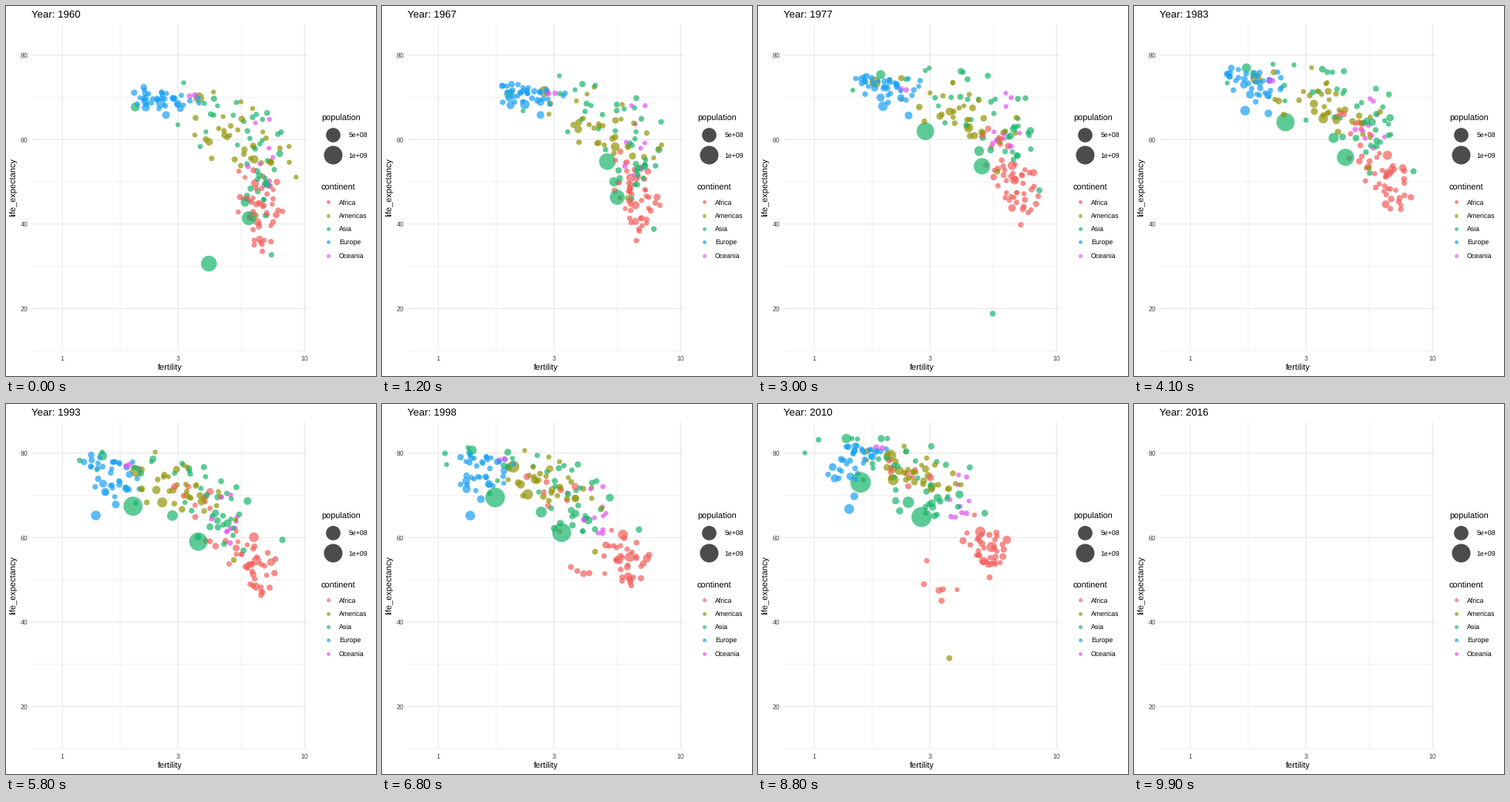
Write a matplotlib script that moves like this. It is 480 px wide and 480 px high and loops after 10 s.

```python
import numpy as np
import matplotlib.pyplot as plt
from matplotlib.animation import FuncAnimation

SIZE, DPI = 480, 96
PT = 72 / DPI
FRAMES, INTERVAL = 100, 100
FIRST, LAST, END = 1960, 2015, 2016
KEYS = [1960, 1977, 1993, 2004]
COLORS = {
    "Africa": "#F35E5A",
    "Americas": "#929507",
    "Asia": "#18B56A",
    "Europe": "#18A0F4",
    "Oceania": "#E252F1",
}
ALPHA = 0.7

rng = np.random.default_rng(5)
plt.rcParams["font.family"] = "Liberation Sans"
plt.rcParams["text.hinting"] = "none"

fig = plt.figure(figsize=(SIZE / DPI, SIZE / DPI), dpi=DPI, facecolor="white")
ax = fig.add_axes([0, 0, 1, 1])
ax.set_xlim(0, SIZE)
ax.set_ylim(SIZE, 0)
ax.axis("off")


# ---- scales ----
def px_x(fertility):
    return 73 + 314.3 * np.log10(fertility)


def px_y(life):
    return 63.7 + (80 - life) * 5.477


def radius(people):
    """Radius in pixels for a population in millions."""
    return 2.96 + 10.66 * np.sqrt(np.asarray(people) / 1376)


def area(r):
    return (2 * np.asarray(r) * PT) ** 2


# ---- grid, axes and legend ----
def label(x, y, s, size, color="black", **kw):
    return ax.text(x, y, s, fontsize=size * PT, color=color,
                   va="baseline", **kw)


def rule(xs, ys, width):
    ax.plot(xs, ys, color="#E6E6E6", lw=width * PT, zorder=1,
            solid_capstyle="butt", snap=False)


LEFT, RIGHT, TOP, BOTTOM = 33, 392, 24, 447
for life in range(10, 81, 10):
    rule([LEFT, RIGHT], [px_y(life)] * 2, 0.55 if life % 20 else 1.1)
    if life % 20 == 0:
        label(28.3, px_y(life) + 3.3, str(life), 8.8, "#444444", ha="right")
for f in (1, 3, 10):
    rule([px_x(f)] * 2, [TOP, BOTTOM], 1.1)
    label(px_x(f), 460, str(f), 8.8, "#444444", ha="center")
for f in (3 ** 0.5, 30 ** 0.5):
    rule([px_x(f)] * 2, [TOP, BOTTOM], 0.55)

label(212.5, 473, "fertility", 11, ha="center")
label(13, 235.5, "life_expectancy", 11, ha="center", rotation=90,
      rotation_mode="anchor")
title = label(33, 15, "", 13.2)

label(409, 149, "population", 11)
for y, people, name in ((166.7, 500, "5e+08"), (193.2, 1000, "1e+09")):
    ax.scatter(423.6, y, s=area(radius(people)), c="black", alpha=ALPHA, lw=0)
    label(444.5, y + 3.3, name, 8.8)
label(409, 239, "continent", 11)
for i, (name, color) in enumerate(COLORS.items()):
    y = 254.3 + 17.3 * i
    ax.scatter(417.6, y, s=area(2.45), c=color, alpha=ALPHA, lw=0)
    label(432, y + 3.4, name, 8.8)


# ---- countries ----
class Country:
    """Follows (fertility, life) key points, offset by its own deviation."""

    def __init__(self, continent, people, growth, path,
                 wide=(0, 0), tall=(0, 0), corr=0, shock=None):
        self.color = COLORS[continent]
        self.people, self.growth = people, growth
        fertility, self.life = np.transpose(path)
        self.logf = np.log10(fertility)
        self.wide, self.tall, self.corr = wide, tall, corr
        self.shock = shock
        self.home = np.clip(rng.normal(size=2), -1.8, 1.8)
        self.phase = rng.uniform(0, 2 * np.pi, 2)

    def at(self, year):
        t = (year - FIRST) / (LAST - FIRST)
        logf = np.interp(year, KEYS, self.logf)
        life = np.interp(year, KEYS, self.life)

        u, w = self.home + 0.35 * np.sin(t * 9 + self.phase)
        v = self.corr * u + np.sqrt(1 - self.corr ** 2) * w
        logf += u * np.interp(t, [0, 1], self.wide)
        life += v * np.interp(t, [0, 1], self.tall)

        # families converge on two children while lives keep lengthening
        late = max(year - KEYS[-1], 0)
        logf += 0.017 * late * (np.log10(2) - logf)
        life += 0.27 * late

        if self.shock:
            when, span, births, years = self.shock
            hit = np.exp(-((year - when) / span) ** 2)
            logf -= births * hit
            life -= years * hit
        life = min(life, 74 + 0.19 * (year - FIRST))
        people = self.people * (1 + (self.growth - 1) * t)
        return px_x(10 ** min(logf, 0.965)), px_y(life), radius(people)


countries = []


def track(*args, **kw):
    countries.append(Country(*args, **kw))


def group(n, continent, typical, growth, path, wide, tall, corr=-0.3):
    for _ in range(n):
        people = min(typical * np.exp(1.2 * rng.normal()), 60)
        track(continent, people, growth, path, wide, tall, corr)


# western and eastern Europe
group(20, "Europe", 6, 1.2, [(2.63, 70.6), (1.89, 74.1), (1.63, 77.8), (1.6, 79.4)],
      (0.065, 0.06), (1.4, 1.1))
group(18, "Europe", 5, 1.1, [(2.59, 68.3), (2.19, 70.5), (1.63, 71.2), (1.31, 73.7)],
      (0.07, 0.04), (2, 3))
# central, northern and southern Africa
group(35, "Africa", 3, 3, [(6.34, 42.3), (6.8, 49.3), (6.1, 54.2), (5.67, 56.2)],
      (0.042, 0.05), (5, 3.2))
group(8, "Africa", 4, 2.5, [(6.97, 49.3), (5.76, 58.8), (3.53, 69.7), (2.54, 73.4)],
      (0.04, 0.1), (4, 3), -0.6)
group(6, "Africa", 2, 2.5, [(6.34, 46), (6.1, 53.3), (4.4, 60.2), (3.6, 46)],
      (0.04, 0.06), (2.5, 3.5))
# Asia, early and late in the transition
group(20, "Asia", 4, 2.2, [(5.1, 62.8), (4.24, 68.8), (2.77, 73.4), (2.22, 75.2)],
      (0.11, 0.16), (4, 3.2), -0.4)
group(18, "Asia", 7, 2.4, [(6.57, 51.5), (6.47, 60.2), (4.56, 63.9), (3.05, 67.5)],
      (0.05, 0.1), (6.5, 4))
group(33, "Americas", 3.5, 2, [(5.4, 60.2), (4, 66.6), (3.05, 71.9), (2.63, 74.3)],
      (0.12, 0.1), (5.5, 3), -0.6)
# Pacific islands, Australia and New Zealand
group(10, "Oceania", 0.3, 2, [(6.2, 54.2), (5.6, 61.5), (4.49, 63.3), (3.94, 66)],
      (0.06, 0.05), (7, 4))
group(2, "Oceania", 4, 2, [(3.5, 71), (2.32, 72.5), (1.89, 77.8), (1.84, 80.5)],
      (0.02, 0.02), (0.4, 0.5))

# China, India, Indonesia, Japan
track("Asia", 645, 2.13, [(7.2, 50), (2.87, 62), (1.95, 67.5), (1.51, 71.5)],
      shock=(1960.3, 1.7, 0.26, 20))
track("Asia", 450, 2.9, [(5.89, 41.4), (4.92, 53.7), (3.63, 59.1), (2.87, 63.3)])
track("Asia", 88, 2.9, [(5.68, 45.1), (4.79, 57.3), (2.83, 65.3), (2.5, 66.8)])
track("Asia", 93, 1.36, [(2, 67.7), (1.88, 75.4), (1.46, 79.4), (1.3, 82)])
# Hong Kong, Macau, Yemen, Cambodia
track("Asia", 3, 2.3, [(3.85, 68.6), (2.39, 74.3), (1.17, 78.3), (0.97, 81.6)])
track("Asia", 0.2, 3, [(3, 63.5), (1.44, 71.7), (1.39, 76.1), (0.84, 78.5)])
track("Asia", 5, 5, [(7.3, 32.7), (8.5, 48), (8.1, 59.6), (5.59, 64.2)])
track("Asia", 6, 2.6, [(6.9, 42), (5.45, 52), (5.6, 57), (3.5, 67)],
      shock=(1977.7, 3.2, 0, 35))
# United States, Brazil, Haiti
track("Americas", 186, 1.73, [(3.66, 69.9), (1.78, 73.6), (2.02, 75.8), (2.06, 77.8)])
track("Americas", 73, 2.85, [(6.2, 55.3), (4.33, 62.8), (2.57, 68.4), (2.13, 72.1)])
track("Americas", 4, 2.7, [(6.3, 42), (5.7, 52.4), (5.1, 54.7), (3.85, 58.6)],
      shock=(2010, 0.5, 0, 35))
# Russia, Nigeria, Rwanda
track("Europe", 120, 1.2, [(2.55, 68.6), (1.92, 67.9), (1.37, 65.2), (1.34, 65.2)])
track("Africa", 45, 4, [(6.38, 40.5), (6.72, 50.4), (6.33, 54.6), (6.02, 56.2)])
track("Africa", 3, 3.8, [(8.1, 43), (8.4, 46.6), (6.6, 47), (5.8, 52)],
      shock=(1994, 0.6, 0, 34))

rng.shuffle(countries)
cloud = ax.scatter([0] * len(countries), [0] * len(countries),
                   c=[c.color for c in countries], alpha=ALPHA, lw=0, zorder=3)


def draw(frame):
    year = FIRST + (END - FIRST) * frame / (FRAMES - 1)
    title.set_text(f"Year: {round(year)}")
    cloud.set_visible(year <= LAST)
    x, y, r = np.transpose([c.at(year) for c in countries])
    cloud.set_offsets(np.column_stack([x, y]))
    cloud.set_sizes(area(r))
    return title, cloud


anim = FuncAnimation(fig, draw, frames=FRAMES, interval=INTERVAL,
                     repeat=True, repeat_delay=0, blit=False)
plt.show()
```
